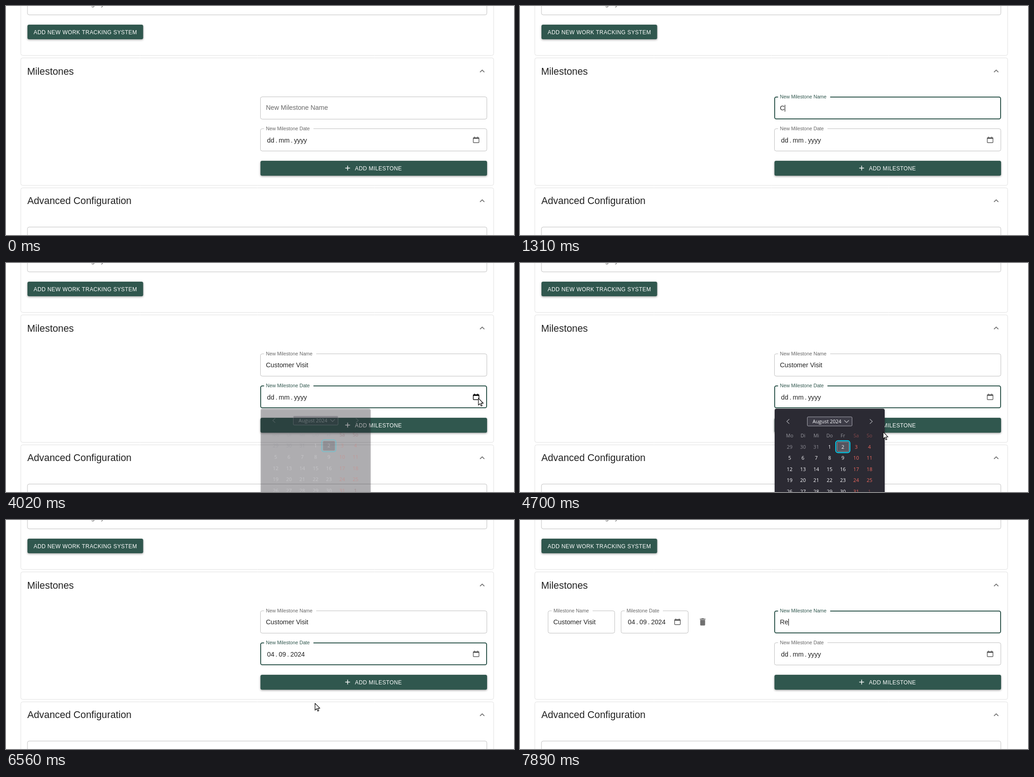
Write an HTML page with a canvas that moves like this. It is 1113x503 px and loops after 8 s.

```html
<!DOCTYPE html>
<html lang="en">
<head>
<meta charset="utf-8">
<title>Milestones</title>
<style>
  html, body { margin: 0; width: 100%; height: 100%; overflow: hidden; background: #fff; }
  canvas { display: block; }
</style>
</head>
<body>
<canvas id="stage" width="1113" height="503"></canvas>
<script>
const ctx = document.getElementById('stage').getContext('2d');
const LOOP = 8000;
const SANS = '"Liberation Sans", Arial, sans-serif';
const UI = '"Open Sans", "Noto Sans", sans-serif';
const GREEN = '#30574e', INK = 'rgba(0,0,0,.87)', MUTED = 'rgba(0,0,0,.6)', ICON = 'rgba(0,0,0,.56)';

// Event times in ms
const FOCUS = 800, OPEN = 3930, NEXT = 5240, PICK = 6230, PRESS = 6865, ADD = 6980, REFOCUS = 7540;
const NAME = 'Customer Visit';
const KEYS = [1310, 1510, 1710, 1910, ...Array.from({ length: 9 }, (_, i) => 2110 + 83.3 * i), 2990];
const KEYS2 = [7750, 7820];

// Pointer: time, x, y
const PATH = [
  [190, 745, 407], [760, 667, 230], [3360, 667, 230], [3880, 1035, 297], [4430, 1035, 297],
  [4770, 767, 380], [4910, 767, 380], [5210, 773, 350], [5510, 773, 350], [5950, 668, 427],
  [6130, 650, 427], [6420, 650, 427], [6810, 741, 345], [7270, 741, 345], [7520, 680, 228]
];

const DELETE = new Path2D('M6 19c0 1.1.9 2 2 2h8c1.1 0 2-.9 2-2V7H6v12zM19 4h-3.5l-1-1h-5l-1 1H5v2h14V4z');
const LESS = new Path2D('M12 8l-6 6 1.41 1.41L12 10.83l4.59 4.58L18 14z');
const PLUS = new Path2D('M19 13h-6v6h-2v-6H5v-2h6V5h2v6h6v2z');
const ARROW = new Path2D('M0 0V15.2L3.5 11.9 5.9 17.2 8.2 16.2 5.9 11H10.7Z');
const HAND = new Path2D('M-1.5 1Q-1.5-.5 0-.5 1.5-.5 1.5 1V7Q4 6 4.5 8 7 7.2 7.3 9 10 8.5 10 11V14Q9.5 17 8 19H0Q-1 16.5-4.5 12.5-5.5 10.5-3.5 10.5L-1.5 12Z');

const clamp = v => Math.max(0, Math.min(1, v));
const mix = (a, b, u) => a + (b - a) * u;
const smooth = u => u * u * (3 - 2 * u);

function bezier(x1, y1, x2, y2) {
  const at = (a, b, s) => 3 * a * s * (1 - s) ** 2 + 3 * b * s * s * (1 - s) + s ** 3;
  return u => {
    let lo = 0, hi = 1;
    for (let i = 0; i < 20; i++) {
      const mid = (lo + hi) / 2;
      if (at(x1, x2, mid) < u) lo = mid; else hi = mid;
    }
    return at(y1, y2, lo);
  };
}
const easeOut = bezier(0, 0, .2, 1), easeInOut = bezier(.4, 0, .2, 1);

function text(s, x, y, size, color, { font = SANS, align = 'left', spacing = 0 } = {}) {
  ctx.font = `${size}px ${font}`;
  ctx.textAlign = align;
  ctx.letterSpacing = spacing + 'px';
  ctx.fillStyle = color;
  ctx.fillText(s, x, y);
  return ctx.measureText(s).width;
}

function box(x, y, w, h, r, { fill, stroke, line = 1, shadow } = {}) {
  ctx.save();
  ctx.beginPath();
  ctx.roundRect(x, y, w, h, r);
  if (shadow) {
    ctx.shadowColor = `rgba(0,0,0,${shadow.alpha})`;
    ctx.shadowBlur = shadow.blur;
    ctx.shadowOffsetY = shadow.y;
  }
  if (fill) { ctx.fillStyle = fill; ctx.fill(); }
  if (stroke) { ctx.strokeStyle = stroke; ctx.lineWidth = line; ctx.stroke(); }
  ctx.restore();
}

function icon(path, cx, cy, scale, color) {
  ctx.save();
  ctx.translate(cx - 12 * scale, cy - 12 * scale);
  ctx.scale(scale, scale);
  ctx.fillStyle = color;
  ctx.fill(path);
  ctx.restore();
}

function line(points, color, width) {
  ctx.beginPath();
  points.forEach(([x, y]) => ctx.lineTo(x, y));
  ctx.strokeStyle = color;
  ctx.lineWidth = width;
  ctx.stroke();
}

function field(x, y, w, label, { float = 1, focus, hover } = {}) {
  if (focus) box(x + .5, y + .5, w - 1, 48, 3.5, { stroke: GREEN, line: 2 });
  else box(x, y, w, 49, 4, { stroke: hover ? INK : 'rgba(0,0,0,.25)' });
  ctx.font = '10.74px ' + SANS;
  ctx.letterSpacing = '0px';
  const gap = (ctx.measureText(label).width + 12) * clamp((float - .4) / .6);
  ctx.fillStyle = '#fff';
  ctx.fillRect(x + 8, y - 2, gap, 5);
  text(label, x + 12, y + mix(28.5, 3.5, float), mix(14.3, 10.74, float), focus ? GREEN : MUTED);
}

function dateText(parts, x, y) {
  parts.forEach((part, i) => {
    const w = text(part, x, y, 14.3, INK);
    if (i < 2) text('.', x + w + 2.6, y, 14.3, INK);
    x += w + 9.6;
  });
}

function dateIcon(x, y, color) {
  box(x + .7, y + 2.2, 12.6, 11, 1.5, { stroke: color, line: 1.4 });
  ctx.fillStyle = color;
  ctx.fillRect(x + .7, y + 2, 12.6, 2.8);
  ctx.fillRect(x + 2.6, y, 1.6, 3);
  ctx.fillRect(x + 9.8, y, 1.6, 3);
}

function pointerAt(t) {
  let i = PATH.findIndex(k => k[0] > t);
  if (i < 0) i = PATH.length;
  const a = PATH[Math.max(0, i - 1)], b = PATH[Math.min(i, PATH.length - 1)];
  const u = b === a ? 0 : smooth(clamp((t - a[0]) / (b[0] - a[0])));
  const shown = (t >= 200 && t < KEYS[0]) || (t >= 3400 && t < KEYS2[0]);
  return { x: mix(a[1], b[1], u), y: mix(a[2], b[2], u), shown };
}

function drawPointer({ x, y }, kind) {
  ctx.save();
  ctx.translate(x, y);
  if (kind === 'text') {
    for (const [color, w] of [['#fff', 2.4], ['#222', 1]]) {
      line([[-3, -8], [3, -8]], color, w);
      line([[0, -8], [0, 8]], color, w);
      line([[-3, 8], [3, 8]], color, w);
    }
  } else {
    const shape = kind === 'hand' ? HAND : ARROW;
    ctx.lineJoin = 'round';
    ctx.strokeStyle = '#111';
    ctx.lineWidth = 1.3;
    ctx.fillStyle = '#fff';
    ctx.fill(shape);
    ctx.stroke(shape);
    if (kind === 'hand') for (const k of [2, 4.7, 7.3]) line([[k, 9], [k, 12]], '#111', .9);
  }
  ctx.restore();
}

function calendar(t, p) {
  const alpha = t < PICK ? clamp((t - 3978) / 140) : 1 - clamp((t - PICK) / 70);
  if (alpha <= 0) return;
  const september = t >= NEXT;
  ctx.save();
  ctx.globalAlpha = alpha;
  box(558, 320, 241, 240, 4, { fill: '#2b2a33', shadow: { alpha: .3, blur: 4, y: 1 } });
  if (t < PICK) ctx.translate(0, -3 * (1 - alpha));

  if (Math.hypot(p.x - 769, p.y - 348) < 14) box(757, 337, 24, 22, 3, { fill: '#52525e' });
  line([[590, 343], [584.5, 348], [590, 353]], '#a5a5ab', 1.2);
  line([[766.5, 343], [772, 348], [766.5, 353]], '#a5a5ab', 1.2);

  const title = september ? 'September 2024' : 'August 2024';
  ctx.font = '10.9px ' + UI;
  ctx.letterSpacing = '0px';
  const w = ctx.measureText(title).width + 35, left = 678.5 - w / 2;
  box(left, 338, w, 20, 2, { fill: '#3d3c47', stroke: '#a9a9b2' });
  text(title, left + 11.5, 352.3, 10.9, '#fbfbfe', { font: UI });
  line([[left + w - 17, 345.5], [left + w - 12, 350.5], [left + w - 7, 345.5]], '#c8c8ce', 1.1);

  const colX = c => 590.8 + 29.15 * c, rowY = r => 403.5 + 24.6 * r;
  const center = { font: UI, align: 'center' };
  ['Mo', 'Di', 'Mi', 'Do', 'Fr', 'Sa', 'So'].forEach((d, c) =>
    text(d, colX(c), 382.8, 10.6, c > 4 ? '#85484b' : '#97979e', center));

  const month = september ? 8 : 7, first = september ? 26 : 29;
  const hoverCol = Math.round((p.x - colX(0)) / 29.15), hoverRow = Math.round((p.y - rowY(0)) / 24.6);
  for (let i = 0; i < 35; i++) {
    const c = i % 7, r = Math.floor(i / 7), x = colX(c), y = rowY(r);
    const date = new Date(2024, month - 1, first + i);
    const day = date.getDate(), inside = date.getMonth() === month;
    const today = !september && inside && day === 2;
    if (today || (c === hoverCol && r === hoverRow))
      box(x - 12.8, y - 10.5, 26, 21, 2, { fill: '#55555f', stroke: '#a0a0a8' });
    if (inside && day === 2) box(x - 15.6, y - 13, 31, 26, 5, { stroke: '#00ddff', line: 1.9 });
    const color = c > 4 ? (inside ? '#f0695f' : '#85484b') : (inside ? '#fbfbfe' : '#8d8c95');
    text(day, x, y + 4, 10.9, color, center);
  }
  ctx.restore();
}

function addButton(t, over) {
  // Hover fades in and out over 250 ms
  const hover = over ? 1 - clamp((6740 - t) / 200) * (t > 6000) : t > 7300 ? 1 - clamp((t - 7340) / 250) : 0;
  const shade = [[48, 33], [87, 60], [78, 54]].map(([a, b]) => Math.round(mix(a, b, hover)));
  box(557.5, 340, 496.5, 32.7, 3.5, {
    fill: `rgb(${shade})`,
    shadow: { alpha: .38, blur: 4 + 4 * hover, y: 1.5 + hover }
  });
  if (t > PRESS && t < ADD + 550) {
    ctx.save();
    ctx.beginPath();
    ctx.roundRect(557.5, 340, 496.5, 32.7, 3.5);
    ctx.clip();
    const grow = easeInOut(clamp((t - PRESS) / 550)), fade = 1 - easeInOut(clamp((t - ADD) / 550));
    ctx.fillStyle = `rgba(255,255,255,${(.1 + .2 * grow) * fade})`;
    ctx.beginPath();
    ctx.arc(740.5, 346, 315 * grow, 0, 7);
    ctx.fill();
    ctx.restore();
  }
  icon(PLUS, 748.5, 356, .746, '#fff');
  text('ADD MILESTONE', 764.5, 360.5, 12, '#fff', { spacing: .4 });
}

function page() {
  ctx.fillStyle = '#fff';
  ctx.fillRect(0, 0, 1113, 503);
  for (const [y, h] of [[-20.5, 129], [114, 280], [399.5, 150]])
    box(32.5, y, 1036, h, 4, { stroke: '#e0e0e0' });
  box(47, -30, 1006.5, 49.5, 4, { stroke: 'rgba(0,0,0,.25)' });
  text('Select Work Tracking System', 59.5, 0, 14.3, MUTED);
  box(47, 41, 253.5, 32, 3.5, { fill: GREEN, shadow: { alpha: .38, blur: 4, y: 1.5 } });
  text('ADD NEW WORK TRACKING SYSTEM', 60.5, 62, 12, '#fff', { spacing: .4 });
  text('Milestones', 46.3, 151, 21.4, INK);
  text('Advanced Configuration', 46.7, 435.3, 21.4, INK);
  icon(LESS, 1043.3, 143, .895, ICON);
  icon(LESS, 1043.3, 428, .895, ICON);
  box(47, 485.5, 1006.5, 60, 4, { stroke: 'rgba(0,0,0,.25)' });
}

function draw(t) {
  const p = pointerAt(t);
  const popup = t > 3978 && t < PICK + 70;
  const inX = p.shown && p.x > 557 && p.x < 1054;
  const overName = inX && p.y > 199 && p.y < 248;
  const overDate = inX && p.y > 270 && p.y < 319;
  const overAdd = inX && p.y > 340 && p.y < 373 && !popup;
  const overIcon = overDate && p.x > 1015;

  page();

  const rise = from => easeOut(clamp((t - from) / 200));
  const float = t < ADD ? rise(FOCUS) : t < REFOCUS ? 1 - rise(ADD) : rise(REFOCUS);
  const nameFocus = (t >= FOCUS && t < OPEN) || t >= REFOCUS;
  field(557.5, 199.5, 496, 'New Milestone Name', { float, focus: nameFocus, hover: overName });
  const typed = t < ADD
    ? NAME.slice(0, KEYS.filter(k => k <= t).length)
    : 'Re'.slice(0, KEYS2.filter(k => k <= t).length);
  const width = text(typed, 569.5, 229, 14.3, INK);
  if (nameFocus && (t < 2990 || t >= REFOCUS)) {
    ctx.fillStyle = '#000';
    ctx.fillRect(Math.round(569.5 + width), 217, 1, 15);
  }

  field(557.5, 269.5, 496, 'New Milestone Date', { focus: t >= OPEN && t < PRESS, hover: overDate });
  const picked = ['04', '09', '2024'];
  dateText(t >= PICK && t < ADD ? picked : ['dd', 'mm', 'yyyy'], 572, 300);
  dateIcon(1023, 287, overIcon ? '#000' : '#5c5c5c');

  if (t >= ADD) {
    field(61.5, 199.5, 146, 'Milestone Name');
    text(NAME, 73, 229, 14.3, INK);
    field(221.5, 199.5, 147, 'Milestone Date');
    dateText(picked, 236.2, 229);
    dateIcon(338, 216.5, '#5c5c5c');
    icon(DELETE, 400.2, 223.8, .895, ICON);
  }

  addButton(t, overAdd);
  calendar(t, p);
  if (p.shown) drawPointer(p, overAdd ? 'hand' : overName || (overDate && !overIcon && !popup) ? 'text' : 'arrow');
}

const start = performance.now();
function tick() {
  draw((performance.now() - start) % LOOP);
  requestAnimationFrame(tick);
}
tick();
</script>
</body>
</html>
```
